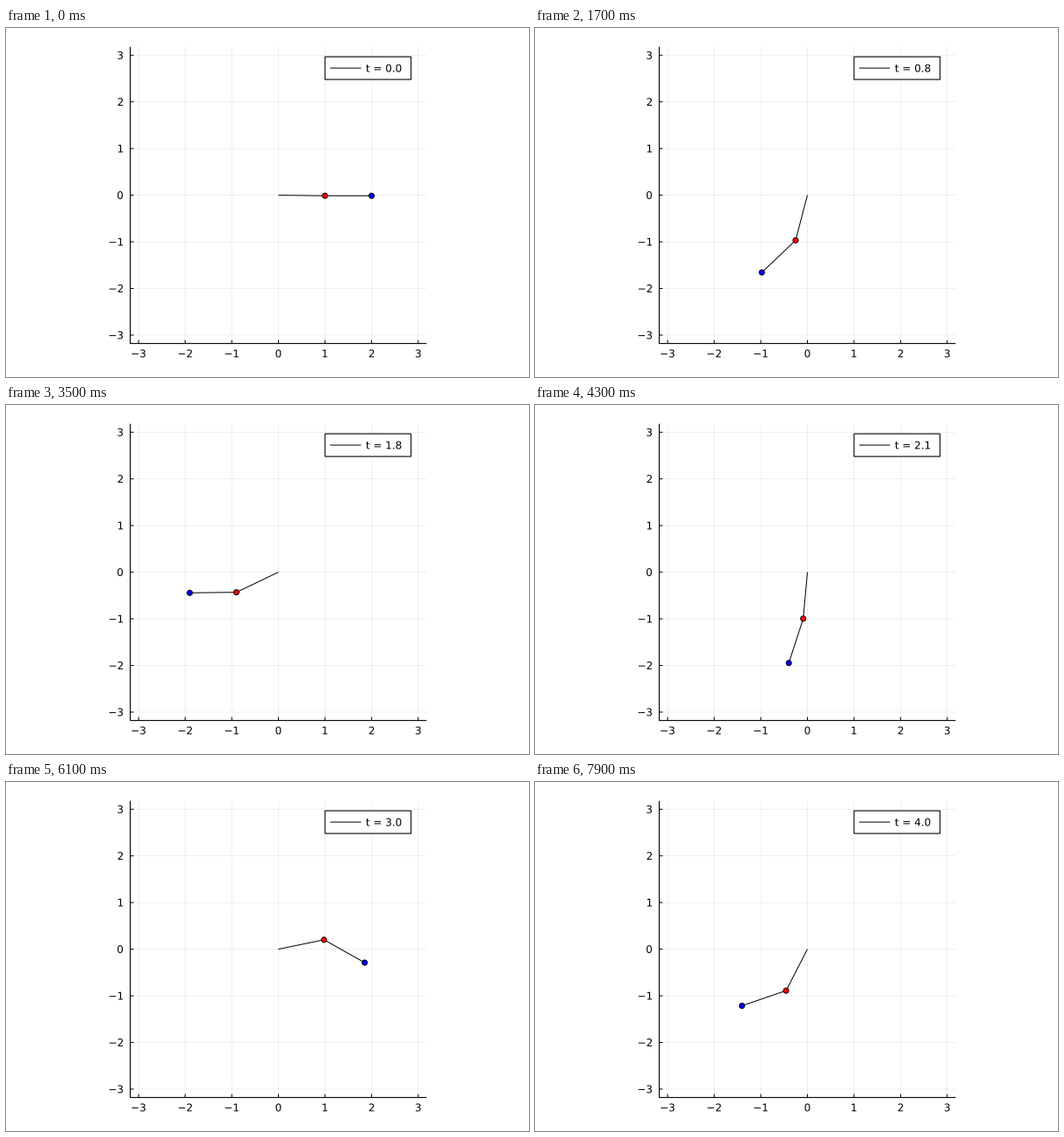
Recreate the animation shown at these times as a matplotlib script. Size 600x400 px, loop 8000 ms.

```python
import numpy as np
import matplotlib.pyplot as plt
from matplotlib.animation import FuncAnimation
from matplotlib.patches import Circle, PathPatch, Rectangle
from matplotlib.textpath import TextPath
from matplotlib.transforms import Affine2D

W, H, DPI = 600, 400, 100
PX = 72 / DPI                      # one pixel in points
FRAMES, INTERVAL = 80, 100
DT, SUBSTEPS, G = 0.05, 20, 9.81

# Plot area in pixels
LEFT, RIGHT, TOP, BOTTOM = 142.5, 482.5, 21.6, 361.6
CX, CY = (LEFT + RIGHT) / 2, (TOP + BOTTOM) / 2
UNIT = (RIGHT - LEFT) / 6.36
TICK = 4
EM = 12


def deriv(s):
    """Double pendulum with unit masses and unit rods."""
    a, b, wa, wb = s
    sd, cd = np.sin(a - b), np.cos(a - b)
    pull = wa**2 * sd - G * np.sin(b)
    acc_a = (-2 * G * np.sin(a) - wb**2 * sd - cd * pull) / (2 - cd**2)
    return np.array([wa, wb, acc_a, pull - cd * acc_a])


def rk4(s, h):
    k1 = deriv(s)
    k2 = deriv(s + h / 2 * k1)
    k3 = deriv(s + h / 2 * k2)
    k4 = deriv(s + h * k3)
    return s + h / 6 * (k1 + 2 * k2 + 2 * k3 + k4)


def simulate():
    s = np.array([np.pi / 2, np.pi / 2, 0.0, 0.0])
    angles = []
    for _ in range(FRAMES):
        for _ in range(SUBSTEPS):
            s = rk4(s, DT / SUBSTEPS)
        angles.append(s[:2])
    return np.array(angles)


def to_px(x, y):
    return CX + UNIT * x, CY - UNIT * y


fig = plt.figure(figsize=(W / DPI, H / DPI), dpi=DPI, facecolor="white")
ax = fig.add_axes([0, 0, 1, 1])
ax.set_xlim(0, W)
ax.set_ylim(H, 0)
ax.axis("off")


def line(xs, ys, **kw):
    style = dict(color="black", lw=PX, solid_capstyle="butt",
                 solid_joinstyle="miter", snap=False)
    return ax.plot(xs, ys, **{**style, **kw})[0]


def glyphs(x, y, text, align):
    """Outline of text centred on y; align is 0 left, 0.5 centre, 1 right."""
    path = TextPath((0, 0), text, size=EM, prop={"family": "DejaVu Sans"})
    box = path.get_extents()
    shift = x - box.x0 - align * box.width
    place = Affine2D().scale(1, -1).translate(shift, y + 0.365 * EM)
    return place.transform_path(path)


def label(x, y, text, align, z=2):
    patch = PathPatch(glyphs(x, y, text, align), fc="black", lw=0,
                      snap=False, zorder=z)
    return ax.add_patch(patch)


def dot(color, z):
    return ax.add_patch(Circle((0, 0), 3.05, fc=color, ec="black",
                               lw=0.95 * PX, snap=False, zorder=z))


for v in range(-3, 4):
    x, y = to_px(v, v)
    name = str(v).replace("-", "\u2212")
    line([x, x], [TOP, BOTTOM], lw=0.6 * PX, alpha=0.1, zorder=1)
    line([LEFT, RIGHT], [y, y], lw=0.6 * PX, alpha=0.1, zorder=1)
    line([x, x], [BOTTOM - TICK, BOTTOM], zorder=2)
    line([LEFT, LEFT + TICK], [y, y], zorder=2)
    label(x, 373, name, 0.5)
    label(134, y, name, 1)

line([LEFT, LEFT, RIGHT], [TOP, BOTTOM, BOTTOM], lw=1.1 * PX, zorder=2)

# Legend
ax.add_patch(Rectangle((366, 33), 98.7, 26, fc="white", ec="black",
                       lw=1.1 * PX, snap=False, zorder=6))
line([372, 407.3], [46, 46], zorder=7)
clock = label(413.1, 46, "t = 0.0", 0, 7)

rods = line([], [], zorder=3)
red, blue = dot("red", 4), dot("blue", 5)
ANGLES = simulate()


def update(i):
    a, b = ANGLES[i]
    x1, y1 = np.sin(a), -np.cos(a)
    x2, y2 = x1 + np.sin(b), y1 - np.cos(b)
    xs, ys = to_px(np.array([0, x1, x2]), np.array([0, y1, y2]))
    rods.set_data(xs, ys)
    red.set_center((xs[1], ys[1]))
    blue.set_center((xs[2], ys[2]))
    clock.set_path(glyphs(413.1, 46, f"t = {i / 20:.1f}", 0))
    return rods, red, blue, clock


anim = FuncAnimation(fig, update, frames=FRAMES, interval=INTERVAL,
                     init_func=lambda: update(0), repeat=True,
                     repeat_delay=0, blit=False)
plt.show()
```
